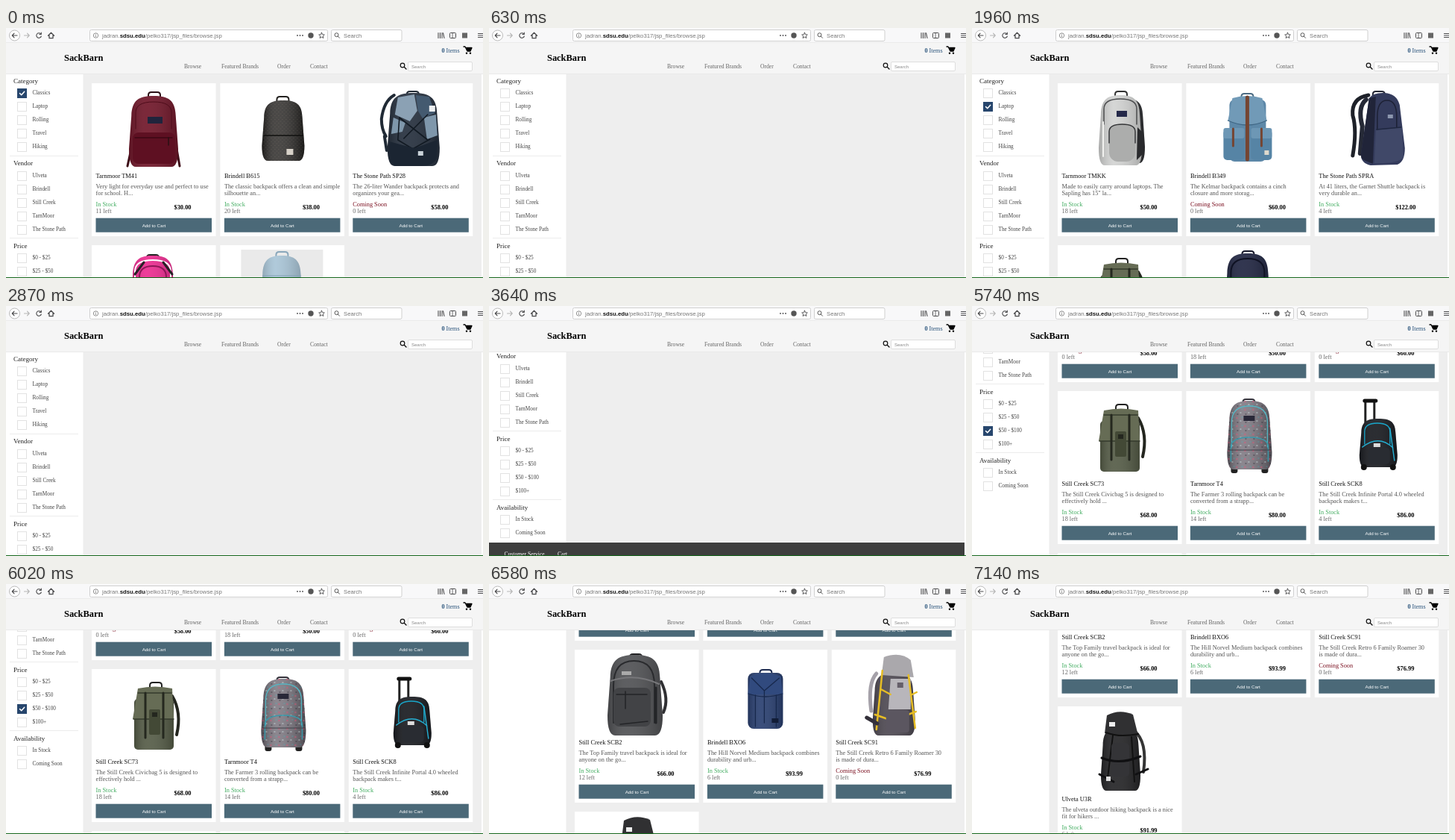
An HTML page that plays this animation: 640x335 px, repeating every 7.28 s.

```html
<!DOCTYPE html>
<html lang="en">
<head>
<meta charset="utf-8">
<title>Backpack shop</title>
<style>
html, body { margin: 0; width: 100%; height: 100%; overflow: hidden; background: #fff; }
svg { display: block; width: 640px; height: 335px; font-family: "Liberation Serif", "Times New Roman", serif; }
.sans { font-family: "Liberation Sans", Arial, sans-serif; }
.anim { animation: 7280ms step-end infinite; }
.page { animation-name: scroll; }
.classics { animation-name: classics; }
.laptops { animation-name: laptops; }
.prices { animation-name: prices; }
.footer { animation-name: footer; }
.tick-classics { animation-name: tick-classics; }
.tick-laptop { animation-name: tick-laptop; }
.tick-price { animation-name: tick-price; }

@keyframes scroll {
  0% { transform: translateY(0); }
  46.15% { transform: translateY(0); animation-timing-function: steps(4); }
  49.99% { transform: translateY(-114px); }
  60.57% { transform: translateY(-114px); animation-timing-function: steps(5); }
  65.38% { transform: translateY(0); }
  71.15% { transform: translateY(0); animation-timing-function: steps(6); }
  76.92% { transform: translateY(-177px); }
  86.53% { transform: translateY(-177px); animation-timing-function: steps(4); }
  90.38% { transform: translateY(-420px); animation-timing-function: steps(7); }
  97.11%, 100% { transform: translateY(-561px); }
}
@keyframes classics {
  0% { opacity: 1; animation-timing-function: steps(9); }
  8.65%, 100% { opacity: 0; }
}
@keyframes laptops {
  0% { opacity: 0; }
  22.11% { opacity: 0; animation-timing-function: steps(5); }
  26.92% { opacity: 1; }
  32.69% { opacity: 1; animation-timing-function: steps(7); }
  39.42%, 100% { opacity: 0; }
}
@keyframes prices {
  0% { opacity: 0; }
  60.57% { opacity: 0; animation-timing-function: steps(5); }
  65.38%, 100% { opacity: 1; }
}
@keyframes footer { 0% { opacity: 0; } 46.15% { opacity: 1; } 61.53%, 100% { opacity: 0; } }
@keyframes tick-classics { 0% { opacity: 1; } .96%, 100% { opacity: 0; } }
@keyframes tick-laptop { 0% { opacity: 0; } 20.19% { opacity: 1; } 32.69%, 100% { opacity: 0; } }
@keyframes tick-price { 0% { opacity: 0; } 50.96%, 100% { opacity: 1; } }
</style>
</head>
<body>
<svg id="stage" viewBox="0 0 640 335"></svg>
<script>
const box = (x, y, w, h, r, fill, extra = '') =>
  `<rect x="${x}" y="${y}" width="${w}" height="${h}" rx="${r}" fill="${fill}" ${extra}/>`;
const shape = (d, fill) => `<path d="${d}" fill="${fill}"/>`;
const line = (d, color, width = 1) =>
  `<path d="${d}" fill="none" stroke="${color}" stroke-width="${width}" stroke-linecap="round" stroke-linejoin="round"/>`;
const dot = (x, y, r, fill) => `<circle cx="${x}" cy="${y}" r="${r}" fill="${fill}"/>`;
const text = (x, y, size, fill, str, extra = '') =>
  `<text x="${x}" y="${y}" font-size="${size}" fill="${fill}" ${extra}>${str}</text>`;
const anim = (name, content) => `<g class="anim ${name}">${content}</g>`;

// Rounded backpack outline with a soft side shade
function shell(x, y, w, h, fill) {
  const X = f => x + w * f, Y = f => y + h * f;
  const d = `M${X(.05)} ${Y(.28)}C${X(.06)} ${Y(.06)} ${X(.2)} ${y} ${X(.5)} ${y}` +
    `S${X(.94)} ${Y(.06)} ${X(.95)} ${Y(.28)}L${X(1)} ${Y(.75)}Q${X(1)} ${Y(1)} ${X(.86)} ${Y(1)}` +
    `H${X(.14)}Q${x} ${Y(1)} ${x} ${Y(.75)}Z`;
  return shape(d, fill) + shape(d, 'url(#shade)');
}
const handle = (x, y, color) => line(`M${x - 8} ${y + 4}V${y - 2}q0-4 4-4h8q4 0 4 4v6`, color, 2);
const arch = (x, y, w, h, color, width) =>
  line(`M${x} ${y + h}V${y + h * .4}Q${x} ${y} ${x + w / 2} ${y}T${x + w} ${y + h * .4}V${y + h}`, color, width);

const bags = {
  maroon: line('M53 88L48 111M114 88L118 111', '#3d0c17', 3) + handle(84, 18, '#2a1015') +
    shell(50, 17, 66, 95, '#701629') + arch(59, 25, 48, 36, '#4e0c1a') +
    box(75, 45, 20, 9, 0, '#20243c') + box(55, 66, 57, 42, 8, '#5e1022') + line('M58 73H108', '#3d0915', 1.5) +
    line('M103 73v10', '#2a1015', 1.5),
  dotted: handle(84, 24, '#242220') + shell(56, 23, 57, 81, '#292725') +
    shell(56, 23, 57, 81, 'url(#dots)') + line('M59 70H111', '#11100f', 1.5) + box(89, 88, 9, 8, 0, '#d7d1c8'),
  slate: line('M61 16Q47 24 44 48Q44 62 50 71M48 71L51 90', '#202a35', 4) + handle(86, 17, '#222b36') +
    shell(52, 13, 70, 98, '#252f3d') + shape('M66 19L88 15L92 37L82 51L62 42Z', '#8ba1b4') +
    shape('M60 46L76 53L72 65L57 68ZM101 46L117 42L119 70L105 75Z', '#7f97ab') +
    shape('M90 16L108 18L116 40L99 47L93 37Z', '#445a70') + box(108, 30, 8, 8, 0, '#edf0f2') +
    line('M68 46L106 76M106 42L74 74M68 46L66 76L86 88L109 75', '#121a23', 1.6) +
    shape('M54 78L88 87L119 76L118 101Q113 111 98 111H63Q55 109 54 99Z', '#1b2532') + box(93, 91, 7, 6, 0, '#c9d2d8'),
  pink: handle(82, 19, '#222') + shell(52, 14, 60, 94, '#ed2c91') + arch(58, 20, 48, 38, '#fff', 2) +
    arch(64, 28, 36, 37, '#8f1758', 2) + line('M58 39L70 23M96 23L108 39', '#262126', 3),
  sky: box(28, 6, 110, 100, 0, '#eaeaea') + handle(83, 15, '#89a7bb') + shell(54, 14, 57, 92, '#a9c5d7') +
    line('M57 41H108', '#82a2b7'),
  silver: handle(85, 17, '#333') + shell(62, 20, 55, 87, '#303134') + shell(55, 16, 58, 94, '#d2d3d2') +
    arch(62, 21, 44, 34, '#4b4c4e', 1.5) + box(79, 37, 14, 8, 0, '#25294a') +
    box(69, 55, 35, 50, 12, '#acadac') + arch(69, 55, 35, 25, '#353638', 1.5) +
    line('M61 52V98', '#f2f2f0', 2) + shape('M107 59L114 66L115 94L106 103Z', '#292a2d'),
  blue: handle(82, 20, '#4c6c84') + box(58, 22, 49, 83, 7, '#5d88a8') +
    shape('M62 20Q82 14 102 20L108 50Q82 62 56 50Z', '#719ab7') + line('M56 50Q82 62 108 50', '#3e6684', 1.3) +
    box(50, 62, 28, 41, 5, '#5684a5') + box(87, 62, 28, 41, 5, '#5684a5') +
    box(50, 60, 28, 14, 3, '#6d97b5') + box(87, 60, 28, 14, 3, '#6d97b5') +
    line('M82 19V102', '#754532', 5) + line('M63 61V84M101 61V84', '#754532', 3) + box(105, 90, 6, 6, 0, '#ded9cd'),
  navy: line('M72 16Q49 20 51 43Q57 63 51 97', '#1e2129', 5) + line('M69 22Q57 32 64 58L61 94', '#252936', 6) +
    handle(86, 17, '#242733') + shape('M73 20Q79 12 94 13Q110 14 114 29L121 87Q121 105 111 109L75 110Q62 107 62 96Z', '#343b5c') +
    shape('M73 20L82 18L78 108L66 103Q62 101 62 96Z', '#202439') + arch(84, 23, 26, 55, '#1d2135', 1.5) +
    shape('M82 63L117 59L119 99Q113 108 80 107Z', '#404868') + line('M83 62L116 59', '#1f2740', 1.5) +
    box(98, 42, 7, 5, 0, '#8c96ae'),
  olive: line('M108 36Q121 58 114 88', '#24261f', 4) + handle(86, 24, '#222') +
    box(57, 40, 53, 68, 5, '#555c47') + box(57, 40, 53, 68, 5, 'url(#shade)') +
    shape('M62 26Q85 21 108 26L110 67H55Z', '#666c55') + line('M62 32H107M56 67H110', '#343a2c', 1.5) +
    line('M72 32V92M96 32V92', '#25281f', 3) + box(77, 54, 15, 34, 2, '#434936') + box(81, 58, 7, 6, 0, '#24271f'),
  ink: handle(83, 14, '#17192a') + shell(52, 11, 61, 95, '#202541') + arch(60, 18, 45, 47, '#0f1223', 2),
  floral: box(60, 101, 9, 9, 3, '#222') + box(101, 101, 9, 9, 3, '#222') + handle(84, 17, '#33313a') +
    shell(55, 13, 60, 92, '#77717b') + shell(55, 13, 60, 92, 'url(#flowers)') +
    arch(61, 20, 48, 55, '#55b6c4', 1.3) + box(77, 33, 15, 7, 0, '#292838') +
    arch(60, 62, 50, 32, '#3999aa', 1.5) + line('M57 79H113', '#403b43'),
  trolley: line('M68 42V13H80V42', '#222', 3) + line('M67 13H82', '#111', 5) +
    shell(60, 37, 51, 65, '#191b20') + arch(67, 43, 34, 28, '#19a7ca', 1.3) +
    line('M64 75Q86 58 105 76M101 50L107 93', '#24add0', 1.5) + box(72, 76, 29, 22, 5, '#292c32') +
    box(79, 70, 9, 5, 0, '#ddd') + dot(66, 102, 4, '#111') + dot(105, 102, 4, '#111'),
  charcoal: handle(82, 12, '#242426') + line('M116 43Q127 66 119 84', '#303033', 4) +
    shell(44, 7, 74, 108, '#505154') + arch(52, 15, 55, 83, '#292a2d', 2) + line('M48 42Q81 31 113 46', '#77777a', 2) +
    box(52, 51, 50, 52, 8, '#424346') + line('M56 60H97M61 100L98 96M68 56V79', '#232427', 1.5) +
    box(63, 29, 13, 5, 0, '#aaa') + line('M109 51V98', '#232427', 3),
  royal: handle(84, 33, '#1d2b50') + box(60, 31, 47, 75, 8, '#293f70') + box(60, 31, 47, 75, 8, 'url(#shade)') +
    shape('M63 36Q83 27 104 36L107 60H60Z', '#314a7e') +
    line('M61 59Q83 67 106 59M65 38L82 55L102 38M82 55V98M70 61V103M98 61V103', '#17284c', 1.3) +
    box(92, 92, 9, 6, 0, '#121d37'),
  trek: line('M60 32Q48 45 53 82', '#a5a1a9', 5) + shell(55, 31, 57, 84, '#4d4851') +
    shape('M70 10Q92 2 106 14L110 37L67 34Z', '#aaa8ac') + shape('M79 39H106V80H76Z', '#b8b6bb') +
    line('M68 28L60 107M103 34L112 105M58 87L81 95L113 83M66 53L79 60M106 61L114 57', '#e6bd25', 2.5) +
    box(73, 81, 31, 30, 4, '#5b5660') + box(88, 44, 8, 7, 0, '#65606a') + line('M47 91L61 99', '#33303a', 5),
  black: line('M102 32Q121 47 115 88', '#353535', 4) + shell(58, 28, 53, 85, '#242426') +
    shape('M66 12Q83 3 101 11L108 39L63 36Z', '#303032') + line('M65 35Q82 42 108 37M74 39L67 96M99 41L103 101', '#111', 2) +
    box(72, 49, 24, 45, 5, '#343437') + line('M59 69Q83 79 111 67M56 91L75 101M105 91L121 84', '#101012', 3) +
    box(69, 21, 8, 6, 0, '#eee') + box(65, 94, 6, 6, 0, '#ddd')
};

const products = {
  tm41: ['maroon', 'Tarnmoor TM41', 'Very light for everyday use and perfect to use', 'for school. H...', 11, '30.00'],
  b615: ['dotted', 'Brindell B615', 'The classic backpack offers a clean and simple', 'silhouette an...', 20, '38.00'],
  sp28: ['slate', 'The Stone Path SP28', 'The 26-liter Wander backpack protects and', 'organizes your gea...', 0, '58.00'],
  tmkk: ['silver', 'Tarnmoor TMKK', 'Made to easily carry around laptops. The', 'Sapling has 15" la...', 18, '50.00'],
  b349: ['blue', 'Brindell B349', 'The Kelmar backpack contains a cinch', 'closure and more storag...', 0, '60.00'],
  spra: ['navy', 'The Stone Path SPRA', 'At 41 liters, the Garnet Shuttle backpack is', 'very durable an...', 4, '122.00'],
  sc73: ['olive', 'Still Creek SC73', 'The Still Creek Civicbag 5 is designed to', 'effectively hold ...', 18, '68.00'],
  t4: ['floral', 'Tarnmoor T4', 'The Farmer 3 rolling backpack can be', 'converted from a strapp...', 14, '80.00'],
  sck8: ['trolley', 'Still Creek SCK8', 'The Still Creek Infinite Portal 4.0 wheeled', 'backpack makes t...', 4, '86.00'],
  scb2: ['charcoal', 'Still Creek SCB2', 'The Top Family travel backpack is ideal for', 'anyone on the go...', 12, '66.00'],
  bxo6: ['royal', 'Brindell BXO6', 'The Hill Norvel Medium backpack combines', 'durability and urb...', 6, '93.99'],
  sc91: ['trek', 'Still Creek SC91', 'The Still Creek Retro 6 Family Roamer 30', 'is made of dura...', 0, '76.99'],
  u3r: ['black', 'Ulveta U3R', 'The ulveta outdoor hiking backpack is a nice', 'fit for hikers ...', 6, '91.99'],
  pink: ['pink'],
  sky: ['sky'],
  ink: ['ink']
};

function card(id, i) {
  const [bag, name, desc1, desc2, left, price] = products[id];
  let out = box(0, 0, 166.5, 205, 0, '#fff') + bags[bag];
  if (name) {
    out += text(5.5, 126.5, 8.35, '#111', name) +
      text(5.5, 140.7, 8.3, '#555', desc1) + text(5.5, 150, 8.3, '#555', desc2) +
      text(5.5, 164.6, 8.3, left ? '#42ac60' : '#7b1020', left ? 'In Stock' : 'Coming Soon') +
      text(5.5, 174, 8.3, '#666', left + ' left') +
      text(122, 169.3, 8.4, '#000', '$' + price, 'text-anchor="middle" font-weight="bold"') +
      box(5.5, 180.7, 155.5, 19, 0, '#4b6978') +
      text(83.5, 192.7, 6.25, '#fff', 'Add to Cart', 'class="sans" text-anchor="middle"');
  }
  const x = 115 + i % 3 * 172.4, y = 74 + Math.floor(i / 3) * 217;
  return `<g transform="translate(${x} ${y})">${out}</g>`;
}
const list = (name, ids) => anim(name, ids.split(' ').map(card).join(''));

const ticks = { Classics: 'tick-classics', Laptop: 'tick-laptop', '$50 - $100': 'tick-price' };
function option(label, y) {
  const tick = box(15, y - 6, 13, 13, 0, '#27466d') + line(`M18.5 ${y + .5}l2.2 2.3 4-4.6`, '#fff', 1.5);
  return box(15.5, y - 5.5, 12, 12, 0, '#fff', 'stroke="#e2e2e2"') +
    (ticks[label] ? anim(ticks[label], tick) : '') + text(35.5, y + 2.4, 7.25, '#444', label);
}
const filter = (title, y, first, labels) => text(10, y + 3, 9, '#222', title) +
  labels.map((label, i) => option(label, first + i * 18)).join('');
const divider = y => box(5, y, 92, 1, 0, '#ececec');

const sidebar = filter('Category', 71, 87, ['Classics', 'Laptop', 'Rolling', 'Travel', 'Hiking']) + divider(171) +
  filter('Vendor', 181, 198, ['Ulveta', 'Brindell', 'Still Creek', 'TarnMoor', 'The Stone Path']) + divider(281) +
  filter('Price', 292, 308, ['$0 - $25', '$25 - $50', '$50 - $100', '$100+']) + divider(373) +
  filter('Availability', 384, 400, ['In Stock', 'Coming Soon']);

const footer = anim('footer', box(0, 431, 638, 120, 0, '#3e3e3e') +
  text(20.5, 449, 7.6, '#fff', 'Customer Service') + text(92, 449, 7.6, '#fff', 'Cart'));

const header = box(0, 20, 640, 41.5, 0, '#f5f5f5') + box(0, 61, 640, 1, 0, '#e9e9e9') +
  text(78, 44.3, 12.4, '#000', 'SackBarn', 'font-weight="bold"') +
  [['Browse', 239], ['Featured Brands', 289], ['Order', 364], ['Contact', 408]]
    .map(([label, x]) => text(x, 53.5, 7.6, '#666', label)).join('') +
  text(584.5, 33.3, 8.1, '#28527a', '<tspan font-weight="bold">0</tspan> Items') +
  line('M614 25h2l3 6h4l2-4.5h-8', '#000', 1.3) + shape('M616.5 26h8.5l-2.5 5h-4z', '#000') +
  dot(618, 33.7, 1.2, '#000') + dot(623, 33.7, 1.2, '#000') +
  line('M534.5 52.5L537 55', '#111', 1.4) +
  '<circle cx="532" cy="50" r="2.8" fill="none" stroke="#111" stroke-width="1.2"/>' +
  box(539.5, 45.5, 86, 12, 1.5, '#fff', 'stroke="#dedede"') + text(544, 53.7, 6, '#888', 'Search', 'class="sans"');

const ink = '#4a4a4c';
const toolbar = box(0, 0, 640, 20, 0, '#f8f8f9') + box(0, 19.5, 640, .5, 0, '#ddd') +
  '<circle cx="11.5" cy="10" r="7" fill="#fff" stroke="#aaa" stroke-width=".8"/>' +
  line('M15 10H8.5M11 7.2L8.3 10L11 12.8', ink, 1.2) + line('M24.5 10H31M28.5 7.2L31.2 10L28.5 12.8', '#b5b5b5', 1.1) +
  line('M46.7 8A3.3 3.3 0 1 0 47.3 11M47.3 6V8.5H44.8', ink, 1.1) +
  line('M56.5 10.2L60.5 6.3L64.5 10.2M58 10V13.7H63V10', ink, 1.3) +
  box(112.5, 2.5, 319, 15, 2, '#fff', 'stroke="#cfcfcf"') + box(436.5, 2.5, 94.5, 15, 2, '#fff', 'stroke="#cfcfcf"') +
  '<circle cx="120.5" cy="10" r="3.2" fill="none" stroke="#777" stroke-width=".8"/>' + line('M120.5 9.8v1.8M120.5 8.2v.1', '#777', .8) +
  text(129, 12.9, 7.75, '#777', 'jadran.<tspan fill="#111" font-weight="bold">sdsu.edu</tspan>/pelko317/jsp_files/browse.jsp', 'class="sans"') +
  [391, 394.5, 398].map(x => dot(x, 10, .9, ink)).join('') + dot(409, 10, 3.7, '#555') +
  line('M423.5 6.2l1.1 2.5 2.7.3-2 1.8.6 2.7-2.4-1.4-2.4 1.4.6-2.7-2-1.8 2.7-.3z', ink, .9) +
  '<circle cx="443.5" cy="9.2" r="2.5" fill="none" stroke="#555"/>' + line('M445.3 11L447.5 13.3', '#555') +
  text(453, 12.8, 7.7, '#777', 'Search', 'class="sans"') +
  line('M580 6.5V13.5M582.5 6.5V13.5M585 6.5V13.5M586.5 6.7L588 13.5', ink, 1.1) +
  box(595.5, 6.5, 8, 7, 1, 'none', `stroke="${ink}"`) + line('M599 7V13', ink, .8) +
  box(612, 6.5, 7, 7, 0, '#666') + line('M633.5 7.5H640M633.5 10H640M633.5 12.5H640', ink, 1);

const pattern = (id, size, content) =>
  `<pattern id="${id}" width="${size}" height="${size}" patternUnits="userSpaceOnUse">${content}</pattern>`;
const defs = '<defs><linearGradient id="shade"><stop stop-opacity=".2"/><stop offset=".35" stop-color="#fff" stop-opacity=".08"/>' +
  '<stop offset="1" stop-opacity=".2"/></linearGradient>' +
  pattern('dots', 5, dot(1, 1, .4, '#786d61') + dot(3.5, 3.5, .4, '#786d61')) +
  pattern('flowers', 11, dot(2, 3, 1.2, '#b65e78') + dot(7, 7, 1.1, '#a9b4b9') + dot(9, 2, .8, '#519daa') + dot(3, 9, .9, '#45414c')) +
  '</defs>';

document.getElementById('stage').innerHTML = defs +
  box(0, 0, 640, 335, 0, '#fff') + box(103.5, 61, 534.5, 274, 0, '#eee') +
  anim('page', sidebar +
    list('classics', 'tm41 b615 sp28 pink sky') +
    list('laptops', 'tmkk b349 spra sc73 ink') +
    list('prices', 'sp28 tmkk b349 sc73 t4 sck8 scb2 bxo6 sc91 u3r') +
    footer) +
  header + toolbar + box(0, 334, 640, 1, 0, '#17681d');
</script>
</body>
</html>
```
